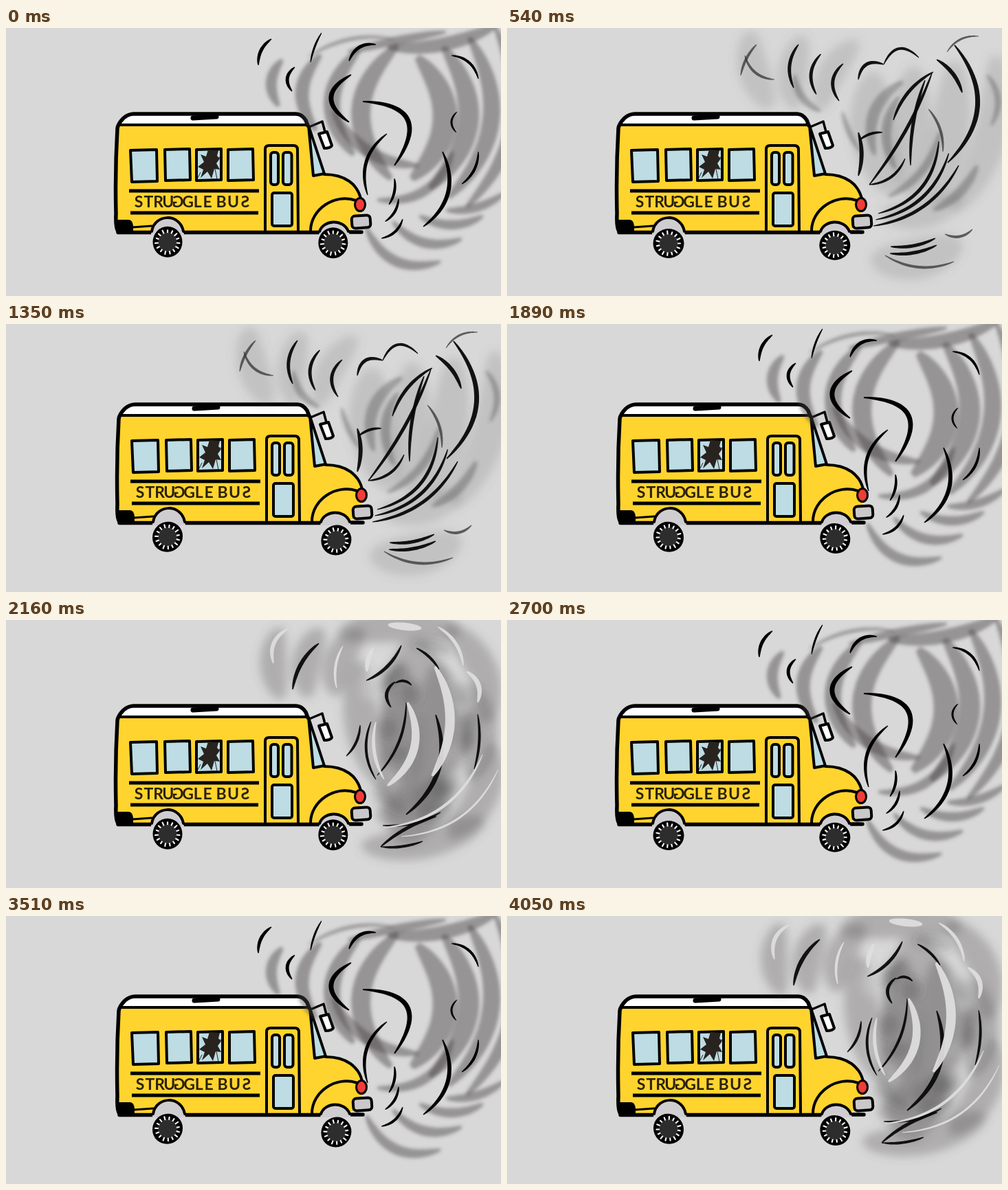
These frames come from a looping animation (720 px wide and 390 px high, 4.32 s). An HTML page:

```html
<!DOCTYPE html>
<html lang="en">
<head>
<meta charset="utf-8">
<title>Struggle bus</title>
<style>
  html, body { margin: 0; width: 100%; height: 100%; overflow: hidden; background: #d8d8d8; }
  svg { display: block; width: 720px; height: 390px; }
  .line { fill: none; stroke: #000; stroke-width: 4; stroke-linecap: round; stroke-linejoin: round; }
  .bold { stroke-width: 5.5; }
  .glass { fill: #bddce3; }
  .yellow { fill: #ffd42e; }
  .gray { fill: #cac8cb; }
  .white { fill: #fff; }
  .lettering { font: 700 23px Lato, "Open Sans", sans-serif; text-anchor: middle; fill: #2b210b; }
</style>
</head>
<body>
<svg viewBox="0 0 720 390">
  <defs>
    <filter id="soft" filterUnits="userSpaceOnUse" x="-60" y="-60" width="840" height="510"><feGaussianBlur stdDeviation="2.6"/></filter>
    <filter id="haze" filterUnits="userSpaceOnUse" x="-60" y="-60" width="840" height="510"><feGaussianBlur stdDeviation="7"/></filter>
    <g id="wheel">
      <ellipse rx="21.500" ry="22.500"/>
      <circle r="14" fill="#2d2d2e"/>
      <g id="spokes" stroke="#f4f4f4" stroke-width="2.2" stroke-linecap="round"/>
    </g>
  </defs>

  <g id="bus">
    <path class="yellow" d="M161 141H438L463 213C494 213 511 228 516 250L515 292H500L455 297H161Z"/>
    <path class="white" d="M164 141Q169 125 186 125H423L436 134V141Z"/>
    <path class="line bold" d="M163 296Q159 290 160 270C159 230 160 180 162 146Q163 139 171 131Q178 125 186 125H422Q430 125 436 134L439 142"/>
    <path class="line" d="M164 141H438"/>
    <path class="line" style="stroke-width:7" d="M272 131L306 129"/>

    <path class="line glass" d="M440 142L463 212L447 215Z"/>
    <path class="line" style="stroke-width:3.500" d="M441 144L460 136L464 151"/>
    <path class="line white" d="M455 154L467 151L474 171Q472 175 463 175Z"/>

    <g class="line">
      <path class="glass" d="M181 178L219 177L220 223L183 224Z"/>
      <path class="glass" d="M231 177L267 176L268 221L232 222Z"/>
      <path class="glass" d="M277 177L313 176V221L277 222Z"/>
      <path class="glass" d="M323 177L359 176L360 221L323 222Z"/>
    </g>
    <path fill="#28231f" d="M283 184L291 187L294 177L309 178L307 186L311 190L306 197L311 206L303 205L299 219L293 209L283 218L287 206L279 202L288 195Z"/>
    <path fill="none" stroke="#28231f" d="M304 205L307 220M308 192L312 186M283 210L279 218"/>

    <path class="line" style="stroke-width:5;stroke-linecap:butt" d="M179 237H368M181 269H367"/>
    <g id="name" class="lettering"></g>

    <path class="line yellow" d="M377 294V176Q377 171 383 171H418Q424 171 424 177L425 294"/>
    <g class="line glass" style="fill:#bddce3">
      <rect x="385" y="181" width="11" height="47" rx="4"/>
      <rect x="403" y="181" width="12.500" height="47" rx="4"/>
      <rect x="387" y="240" width="29" height="48" rx="3"/>
    </g>

    <path class="line bold" d="M163 297.500H212M257 297.500H456M499 297H517"/>
    <path d="M158 279H178Q184 279 185 288V298Q172 302 163 298Z"/>
    <path class="line" style="stroke-width:3" d="M184 290L212 288"/>
    <path fill="#d0cdd1" d="M211 301C212 269 257 269 259 301ZM455 301C459 278 493 276 500 301Z"/>
    <path class="line" d="M212 296C216 270 253 269 258 296M456 296C462 279 490 277 498 296"/>
    <path class="line" d="M463 213C494 213 511 228 516 248M443 295C443 264 478 240 509 251"/>
    <ellipse class="line" cx="515" cy="257" rx="7.500" ry="9.500" style="fill:#f13c38;stroke-width:3"/>
    <rect class="line gray" x="503" y="273" width="27" height="18" rx="5" transform="rotate(-4 516 282)"/>
  </g>
  <use id="rear" href="#wheel"/>
  <use id="front" href="#wheel"/>
  <g id="smoke"></g>
</svg>

<script>
const $ = id => document.getElementById(id);
const STEP = 270, STEPS = 16, POSES = 8;

let seed = 11;
const random = () => (seed = seed * 16807 % 2147483647) / 2147483647;

// A mark is [x0, y0, x1, y1, bend, width]: a tapered bow between two ends.
function brush([x0, y0, x1, y1, bend, width]) {
  const dx = x1 - x0, dy = y1 - y0;
  const cx = (x0 + x1) / 2 - dy * bend, cy = (y0 + y1) / 2 + dx * bend;
  const left = [], right = [];
  for (let i = 0; i <= 24; i++) {
    const t = i / 24, u = 1 - t;
    const x = u * u * x0 + 2 * u * t * cx + t * t * x1;
    const y = u * u * y0 + 2 * u * t * cy + t * t * y1;
    const tx = u * (cx - x0) + t * (x1 - cx), ty = u * (cy - y0) + t * (y1 - cy);
    const half = width / 2 * Math.max(.25, Math.sin(Math.PI * t) ** .4) / Math.hypot(tx, ty);
    left.push([x - ty * half, y + tx * half]);
    right.unshift([x + ty * half, y - tx * half]);
  }
  const outline = left.concat(right).map(p => p.map(v => v.toFixed(1)).join(" "));
  return `<path d="M${outline.join("L")}Z"/>`;
}

// Evenly blended marks from one to another
const fan = (count, from, to) => Array.from({ length: count }, (_, i) =>
  from.map((v, k) => v + (to[k] - v) * i / (count - 1)));

// Random bows circling the middle of the cloud
const swirl = (count, width) => Array.from({ length: count }, () => {
  const angle = random() * 2 * Math.PI, reach = .4 + random() * .55, span = .3 + random() * .4;
  const end = a => [610 + 95 * reach * Math.cos(a), 160 + 150 * reach * Math.sin(a)];
  return [...end(angle), ...end(angle + span), -.15, width * (.6 + random() * .8)];
});

const layer = (color, opacity, filter, marks) =>
  `<g fill="${color}" fill-opacity="${opacity}" ${filter && `filter="url(#${filter})"`}>${marks.map(brush).join("")}</g>`;

const swirling = () => layer("#454143", .45, "soft", [
  ...fan(4, [402, 46, 397, 114, .4, 16], [570, 25, 560, 220, .5, 28]),
  ...fan(4, [598, 42, 590, 220, -.5, 36], [712, 0, 670, 260, -.35, 20]),
  ...fan(3, [440, 42, 565, 16, -.2, 5], [555, 28, 715, -5, .15, 20]),
  ...fan(4, [524, 290, 632, 340, .45, 15], [640, 265, 725, 240, .2, 13]),
  [475, 120, 600, 200, .3, 18],
  [540, 250, 650, 180, .4, 14],
]) + layer("#000", 1, "", [
  [386, 16, 367, 54, .28, 5],
  [459, 7, 443, 50, .1, 3],
  [420, 57, 416, 92, .5, 5],
  [499, 48, 538, 24, -.4, 5],
  [502, 68, 499, 137, .8, 7],
  [519, 107, 565, 200, -.9, 7],
  [554, 154, 526, 243, .35, 5],
  [648, 40, 687, 74, -.35, 4],
  [656, 122, 655, 152, .5, 3],
  [687, 180, 663, 227, -.25, 4],
  [635, 180, 607, 289, -.4, 6],
  ...fan(3, [565, 219, 557, 257, -.2, 4], [577, 278, 546, 306, -.3, 4]),
]);

const scratchy = () => layer("#6b6a6b", .2, "haze", [
  ...fan(3, [355, 5, 385, 115, .2, 45], [510, 20, 455, 120, .2, 40]),
  ...fan(4, [535, 65, 565, 240, .2, 65], [710, 40, 650, 265, -.2, 50]),
  ...fan(2, [545, 270, 660, 245, .2, 45], [530, 335, 660, 310, .2, 60]),
]) + layer("#454345", .35, "soft", [
  ...fan(2, [576, 78, 535, 185, .4, 17], [570, 100, 565, 205, .3, 14]),
  ...fan(2, [418, 68, 456, 121, .3, 11], [488, 122, 514, 180, .1, 8]),
  ...fan(2, [630, 150, 555, 245, -.25, 12], [684, 200, 620, 265, -.2, 14]),
  [698, 68, 704, 142, -.35, 9],
]) + layer("#333", .75, "", [
  [363, 24, 340, 69, .15, 4],
  [346, 40, 389, 75, .35, 4],
  [640, 35, 686, 12, -.3, 3],
  [613, 118, 634, 180, -.2, 4],
  [550, 331, 650, 340, .25, 4],
  [637, 300, 677, 293, .35, 4],
]) + layer("#080808", .95, "", [
  ...fan(3, [424, 24, 417, 87, .3, 5], [489, 52, 483, 106, .45, 5]),
  [511, 75, 548, 53, -.6, 5],
  [548, 53, 599, 43, -.7, 4],
  ...fan(2, [625, 46, 662, 94, -.2, 6], [651, 25, 641, 196, -.45, 7]),
  [620, 64, 562, 134, .2, 5],
  ...fan(2, [608, 76, 587, 200, .1, 5], [618, 66, 527, 228, -.08, 5]),
  [527, 228, 579, 190, .3, 4],
  ...fan(2, [511, 152, 511, 215, -.15, 6], [546, 152, 513, 163, .2, 4]),
  ...fan(3, [540, 270, 628, 165, .35, 5], [533, 288, 657, 200, .25, 5]),
  ...fan(2, [558, 318, 623, 306, .15, 5], [557, 328, 625, 316, .15, 5]),
]);

const billowing = () => layer("#575456", .32, "haze", [
  ...fan(3, [400, 12, 402, 114, .25, 38], [520, 15, 480, 110, .3, 44]),
  ...fan(3, [515, 60, 548, 240, .15, 50], [625, 65, 600, 275, -.2, 70]),
  ...fan(3, [640, 10, 700, 150, -.3, 46], [705, 180, 645, 315, -.25, 48]),
  ...fan(2, [518, 328, 695, 290, .15, 48], [540, 285, 655, 230, .2, 50]),
  [485, 22, 660, 18, -.15, 50],
  [590, 30, 580, 325, -.1, 110],
]) + layer("#3d3a3c", .25, "haze", swirl(16, 24))
  + layer("#dedede", .35, "haze", swirl(8, 22))
  + layer("#0a0a0a", .95, "", [
  [455, 34, 417, 101, .2, 6],
  [575, 37, 524, 88, -.2, 5],
  [597, 41, 630, 72, -.15, 4],
  [566, 90, 560, 127, .5, 5],
  [566, 92, 590, 95, -.4, 4],
  [515, 153, 495, 198, -.2, 4],
  ...fan(2, [531, 148, 538, 232, .25, 4], [582, 120, 540, 226, -.2, 4]),
  [625, 138, 582, 283, -.35, 7],
  [686, 137, 681, 217, -.12, 4],
  ...fan(2, [548, 299, 632, 280, .15, 4], [545, 330, 606, 322, .12, 4]),
  [626, 286, 545, 330, .12, 5],
]) + layer("#dedede", .95, "", [
  [410, 13, 389, 63, .4, 6],
  [556, 7, 604, 12, 0, 11],
  ...fan(2, [490, 38, 481, 99, .2, 4], [534, 41, 525, 75, .15, 7]),
  ...fan(2, [624, 68, 620, 227, -.3, 14], [584, 120, 555, 241, -.4, 12]),
  ...fan(2, [628, 10, 665, 66, -.25, 5], [670, 75, 686, 120, -.4, 7]),
  [538, 148, 550, 232, .2, 5],
  ...fan(2, [693, 196, 550, 302, -.3, 4], [716, 217, 575, 315, -.3, 3]),
]);

$("name").innerHTML = [..."STRUGGLEBUS"].map((letter, i) => {
  const x = i < 8 ? 193 + i * 14.3 : 313 + (i - 8) * 17.5;
  const flip = i === 4 || i === 10 ? -1 : 1;
  return `<text transform="translate(${x} 261) scale(${flip} 1)">${letter}</text>`;
}).join("");

$("spokes").innerHTML = Array.from({ length: 15 }, (_, i) =>
  `<path d="M0-14V${-17 - i % 3 / 2}" transform="rotate(${i * 24})"/>`).join("");

$("smoke").innerHTML = [swirling, billowing, scratchy].map(cloud => `<g>${cloud()}</g>`).join("");
const clouds = [...$("smoke").children];

const place = (id, x, y, angle = 0) =>
  $(id).setAttribute("transform", `translate(${x} ${y}) rotate(${angle})`);

function draw() {
  const step = Math.floor((performance.now() - start) / STEP) % STEPS;
  const pose = step % POSES, turn = pose / POSES * 2 * Math.PI;
  place("bus", Math.min(2, Math.max(0, pose - 3)), pose % 2 ? -8 : 0);
  place("rear", 235, 311.3 + 2.2 * Math.sin(turn), pose * 45);
  place("front", 478 - 2.5 * Math.cos(turn - .5), 314.5 + 2.5 * Math.sin(turn - .8), pose * 45);
  // The clouds take turns; the first one lingers at the end of every seven steps.
  const current = step % 7 % 3;
  clouds.forEach((cloud, i) => cloud.style.display = i === current ? "" : "none");
  requestAnimationFrame(draw);
}
const start = performance.now();
draw();
</script>
</body>
</html>
```
